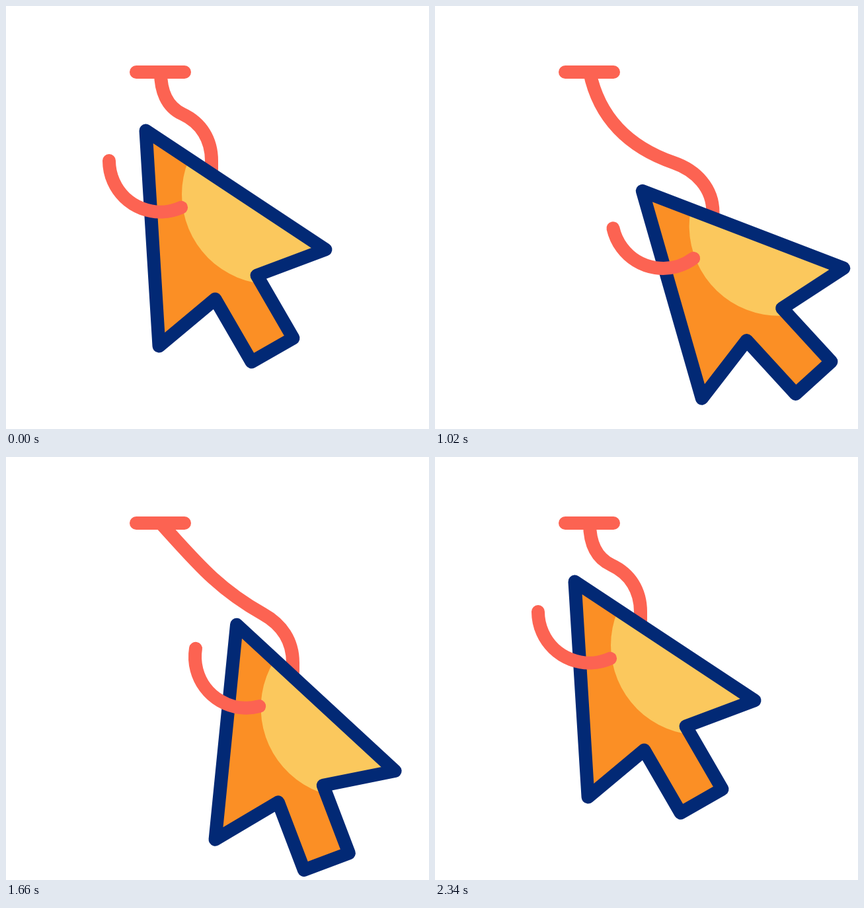
These frames come from a looping animation (640 px wide and 640 px high, 2400 ms). An HTML page with a canvas:

```html
<!DOCTYPE html>
<html lang="en">
<head>
<meta charset="utf-8">
<title>Hooked cursor</title>
<style>
  html, body { margin: 0; width: 100%; height: 100%; overflow: hidden; background: #fff; }
  canvas { display: block; width: 100vmin; height: 100vmin; }
</style>
</head>
<body>
<canvas id="stage"></canvas>
<script>
const SIZE = 640, LOOP = 2400, STEP = 20, RAD = Math.PI / 180;
const CORAL = '#fc6352', NAVY = '#022975', ORANGE = '#fb8f25', YELLOW = '#fbc85d';
const PIVOT = [265, 304], PULL = [126, 77], TOP = [234, 100];
const BEND = 0.38; // handle length as a share of each rope span

const canvas = document.getElementById('stage');
const ctx = canvas.getContext('2d');
const scale = window.devicePixelRatio || 1;
canvas.width = canvas.height = SIZE * scale;

// Rope pose: angle at the top, angle at the middle, middle x, y, end x, y
const slack = [90, 25, 267, 163.5, 311, 234];
const pulled = [57.5, 20.5, 393, 237, 436, 310];
const dipped = [79, 19, 360, 237, 420, 312];
const dippedAgain = [69, 27, 358, 238, 420, 312];
const raised = [45, 29.5, 397, 242, 442, 316];
const rebound = [90, 23, 254, 163.5, 310, 238];

// Each key is [time, values]
const pull = [[200, [0]], [800, [1]], [1600, [1]], [2000, [0]]];
const tilt = [
  [800, [0]], [1000, [-13]], [1200, [5]], [1400, [-11]],
  [1600, [10]], [2040, [-5.4]], [2350, [0]]
];
const rope = [
  [200, slack], [800, pulled], [1000, dipped], [1200, pulled],
  [1400, dippedAgain], [1600, raised], [2000, rebound], [2350, slack]
];
const cursor = [
  [211.5, 188.5], [483.5, 368.5], [379.5, 407.5], [434.5, 502.5],
  [371.5, 538.5], [316.5, 443.5], [231.5, 514.5]
];

function valueAt(keys, t) {
  const next = keys.findIndex(([time]) => t < time);
  if (next < 0) return keys[keys.length - 1][1];
  if (next === 0) return keys[0][1];
  const [t0, a] = keys[next - 1], [t1, b] = keys[next];
  const u = (t - t0) / (t1 - t0);
  const ease = u * u * (3 - 2 * u);
  return a.map((v, i) => v + (b[i] - v) * ease);
}

// Curve from one point to another, leaving and arriving at given angles
function span([x0, y0], angle0, [x1, y1], angle1) {
  const len = BEND * Math.hypot(x1 - x0, y1 - y0);
  ctx.bezierCurveTo(
    x0 + len * Math.cos(angle0 * RAD), y0 + len * Math.sin(angle0 * RAD),
    x1 - len * Math.cos(angle1 * RAD), y1 - len * Math.sin(angle1 * RAD),
    x1, y1
  );
}

function drawRope([topAngle, midAngle, mx, my, ex, ey]) {
  ctx.beginPath();
  ctx.moveTo(197, 100);
  ctx.lineTo(270, 100);
  ctx.moveTo(...TOP);
  span(TOP, topAngle, [mx, my], midAngle);
  span([mx, my], midAngle, [ex, ey], 90);
  ctx.lineTo(ex, ey + 14); // carries on behind the cursor
  ctx.strokeStyle = CORAL;
  ctx.stroke();
}

function drawCursor() {
  const shape = new Path2D();
  cursor.forEach(([x, y]) => shape.lineTo(x, y));
  shape.closePath();
  ctx.fillStyle = ORANGE;
  ctx.fill(shape);
  ctx.save();
  ctx.clip(shape);
  ctx.beginPath();
  ctx.arc(402, 285, 136, 0, Math.PI * 2);
  ctx.fillStyle = YELLOW;
  ctx.fill();
  ctx.restore();
  ctx.strokeStyle = NAVY;
  ctx.stroke(shape);
}

function drawHook() {
  ctx.beginPath();
  ctx.arc(233.5, 234, 77.5, 66 * RAD, Math.PI);
  ctx.strokeStyle = CORAL;
  ctx.stroke();
}

function draw(t) {
  ctx.setTransform(scale, 0, 0, scale, 0, 0);
  ctx.fillStyle = '#fff';
  ctx.fillRect(0, 0, SIZE, SIZE);
  ctx.lineWidth = 20;
  ctx.lineCap = ctx.lineJoin = 'round';
  drawRope(valueAt(rope, t));

  const [k] = valueAt(pull, t), [angle] = valueAt(tilt, t);
  ctx.translate(PIVOT[0] + k * PULL[0], PIVOT[1] + k * PULL[1]);
  ctx.rotate(angle * RAD);
  ctx.translate(-PIVOT[0], -PIVOT[1]);
  drawCursor();
  drawHook();
}

const start = performance.now();
function tick() {
  const t = Math.max(0, performance.now() - start) % LOOP;
  draw(Math.floor(t / STEP) * STEP);
  requestAnimationFrame(tick);
}
tick();
</script>
</body>
</html>
```
